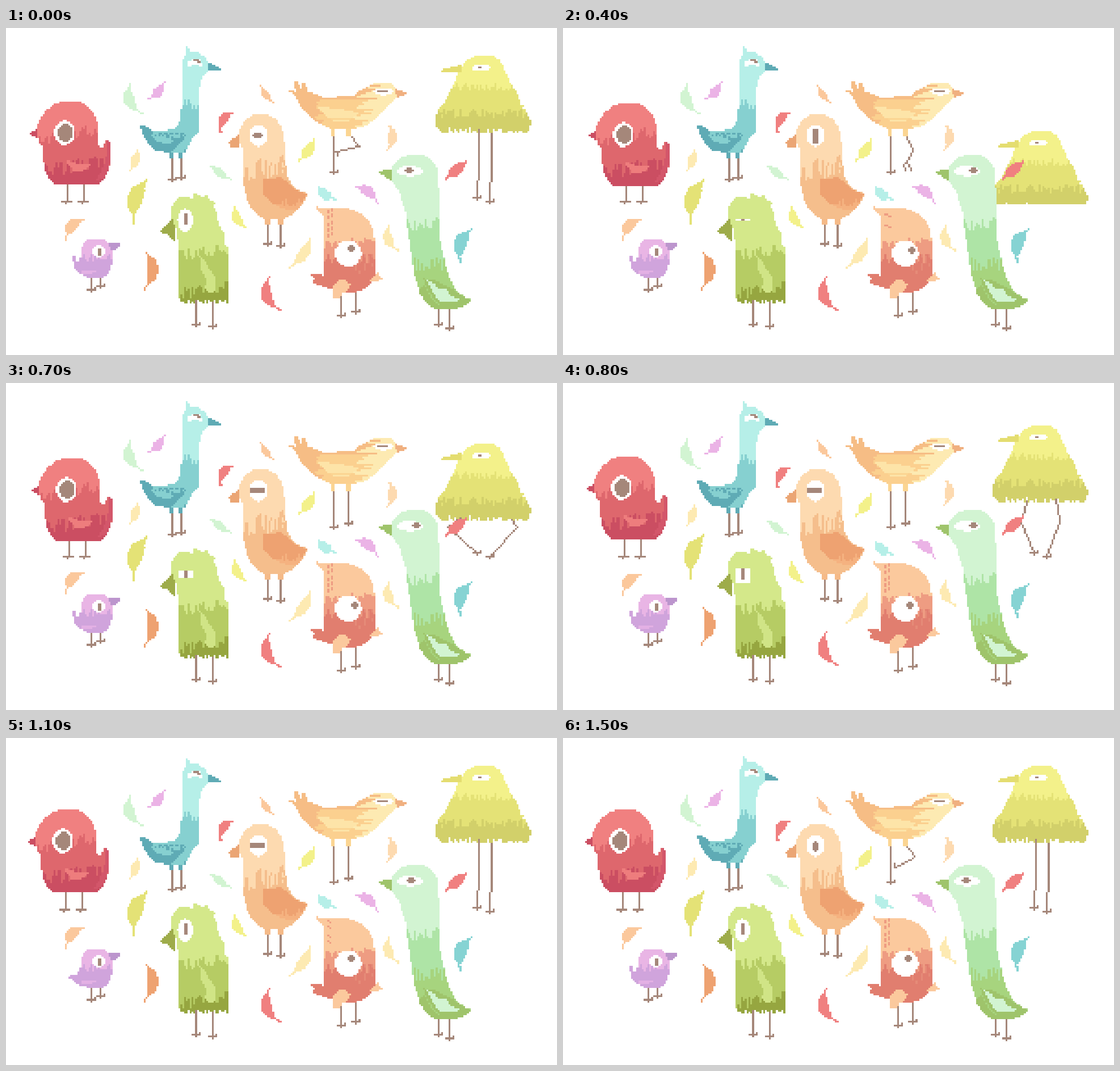
These frames come from a looping animation (971x577 px, 1.6 s). An HTML page with a canvas:

```html
<!DOCTYPE html>
<html lang="en">
<head>
<meta charset="utf-8">
<title>Birds</title>
<style>
html, body { margin: 0; width: 100%; height: 100%; overflow: hidden; background: #fff; }
canvas { display: block; width: 100%; height: 100%; image-rendering: pixelated; }
</style>
</head>
<body>
<canvas id="stage" width="300" height="178"></canvas>
<script>
const ctx = document.getElementById('stage').getContext('2d');
const CW = 971 / 300, CH = 577 / 178;
const STEP = 100, STEPS = 16;
const BROWN = '#a5877a', WHITE = '#fff';
const col = x => Math.floor(x / CW), row = y => Math.floor(y / CH);
const mix = (a, b, k) => a + (b - a) * k;

function hash(a, b = 0) {
  const v = Math.sin(a * 127.1 + b * 311.7) * 43758.5453;
  return v - Math.floor(v);
}

function dot(cx, cy, color, w = 1, h = 1) {
  ctx.fillStyle = color;
  ctx.fillRect(cx, cy, w, h);
}

// Coordinates are stage pixels; dx and dy are whole cells.
function box(x, y, w, h, color, dx = 0, dy = 0) {
  dot(Math.round(x / CW) + dx, Math.round(y / CH) + dy, color,
    Math.max(1, Math.round(w / CW)), Math.max(1, Math.round(h / CH)));
}

const cellCache = new Map();
function cellsOf(d) {
  if (cellCache.has(d)) return cellCache.get(d);
  const n = d.match(/[\d.]+/g).map(Number), path = new Path2D(d), cells = [];
  const xs = n.filter((_, i) => i % 2 === 0), ys = n.filter((_, i) => i % 2);
  for (let cy = row(Math.min(...ys)); cy <= row(Math.max(...ys)); cy++)
    for (let cx = col(Math.min(...xs)); cx <= col(Math.max(...xs)); cx++)
      if (ctx.isPointInPath(path, (cx + .5) * CW, (cy + .5) * CH)) cells.push([cx, cy]);
  cellCache.set(d, cells);
  return cells;
}

function paint(d, color, dx = 0, dy = 0) {
  for (const [cx, cy] of cellsOf(d)) {
    const c = typeof color === 'string' ? color : color((cx + .5) * CW, (cy + .5) * CH, cx, cy);
    if (c) dot(cx + dx, cy + dy, c);
  }
}

function oval(x, y, rx, ry, color, dx = 0, dy = 0) {
  for (let cy = row(y - ry); cy <= row(y + ry); cy++)
    for (let cx = col(x - rx); cx <= col(x + rx); cx++) {
      const u = ((cx + .5) * CW - x) / rx, v = ((cy + .5) * CH - y) / ry;
      if (u * u + v * v <= 1) dot(cx + dx, cy + dy, color);
    }
}

// Small pupil: a box with its four corner cells cut away.
function pupil(x, y, w, h, dx = 0, dy = 0) {
  box(x, y + CH, w, h - 2 * CH, BROWN, dx, dy);
  box(x + CW, y, w - 2 * CW, h, BROWN, dx, dy);
}

function line(color, ...p) {
  for (let i = 0; i + 3 < p.length; i += 2) {
    const x0 = col(p[i]), y0 = row(p[i + 1]), x1 = col(p[i + 2]), y1 = row(p[i + 3]);
    const n = Math.max(Math.abs(x1 - x0), Math.abs(y1 - y0), 1);
    for (let k = 0; k <= n; k++)
      dot(Math.round(mix(x0, x1, k / n)), Math.round(mix(y0, y1, k / n)), color);
  }
}

function foot(x, y, toe = 1) {
  dot(col(x) - 2, row(y), BROWN, 5);
  dot(col(x) + (toe > 0 ? 2 : -3), row(y) - 1 + (toe > 0 ? 0 : 1), BROWN);
  dot(col(x) + (toe > 0 ? 0 : -1), row(y) + 1, BROWN);
}

function leg(x, top, y, toe) {
  line(BROWN, x, top, x, y);
  foot(x, y, toe);
}

// Shaggy horizontal bands of colour, slanted by slope around x0.
function fur(colors, levels, amp = 10, slope = 0, x0 = 0, hem = Infinity) {
  return (x, y, cx) => {
    if (y > hem + (hash(cx, 7) - .5) * 9) return null;
    let i = 0;
    while (i < levels.length &&
      y > levels[i] + slope * (x - x0) + (hash(cx, i + levels[0]) - .5) * 2 * amp) i++;
    return colors[i];
  };
}

function yellowBird(s) {
  const drop = [0, 26, 58, 97, 133, 133, 97, 58, 26][s] || 0;
  const dy = Math.round(drop / CH), k = Math.min(drop / 58, 1.15);
  if (drop < 120) {
    const hip = 176 + drop;
    const knee = Math.max(mix(235, 254, k), hip + 8);
    line(BROWN, mix(832, 805, k), hip, mix(832, 780, k), knee, 831, 299);
    line(BROWN, mix(855, 886, k), hip, mix(855, 902, k), knee, 854, 305);
    foot(831, 299);
    foot(854, 305);
  }
  const coat = fur(['#f3f18a', '#e4e276', '#d2d06a'], [104, 151], 8, 0, 0, 181);
  paint('M830 49L858 49Q872 55 878 72L888 95L902 117L910 142L918 150L925 164L921 186L762 186L756 165L762 142L776 127L788 100L800 74L808 62Q815 52 830 49Z',
    (x, y, cx, cy) => (cy + dy + 1) * CH > 314 ? null : coat(x, y, cx), 0, dy);
  for (let i = 0; i < 18; i++) {
    const left = i % 2, y = 112 + i * 4;
    if (hash(i, 4) > .45 && y < 172)
      box(left ? 784 - (y - 112) * .5 : 900 + (y - 115) * .4, y, 4, 4, y < 148 ? '#e4e276' : '#d2d06a', 0, dy);
  }
  paint('M804 64L804 76L790 78L767 78L767 74L782 70Z', '#e4dd70', 0, dy);
  oval(838, 70, 17, 5.5, WHITE, 0, dy);
  box(831, 69, 7, 3, BROWN, 0, dy);
}

function redBird(s) {
  const d = [0, 0, 1, 1, 1, 1, 1, 1, 0, -1, -1, -1, -1, 0, -1, -1][s], x = d * CW;
  for (const lx of [109, 139]) leg(lx + x, 276 + x, d < 0 ? 302 : 306, -1);
  paint('M98 130L131 130Q146 137 155 152Q163 165 162 190L164 212Q173 212 175 199L181 199L183 207L186 206L186 228Q184 245 175 262Q167 273 159 277L89 277Q78 272 70 255Q65 245 66 212Q54 198 54 180Q56 160 72 145Q85 132 98 130Z',
    fur(['#f08080', '#de676d', '#cb4e62'], [188, 247], 12, -.16, 100), d, d);
  paint('M177 199L181 199L186 208L186 228Q183 248 170 266L158 270Q174 245 177 222Z', '#d3566a', d, d);
  paint('M56 176L42 187L56 197Z', '#cb4e62', d, d);
  paint('M104 233L118 236L130 241L149 241Q142 254 120 253Q112 246 104 233Z', '#ee7d7d', d, d);
  oval(103, 185, 18, 21.5, WHITE, d, d);
  oval(104.5, 185, 13.5, 15.5, BROWN, d, d);
}

function cyanBird(s) {
  const dy = s > 9 && s < 13 ? 1 : 0;
  leg(292, 228, 269);
  leg(308, 228, 263);
  box(288, 220, 8, 11, '#5fabb5', 0, dy);
  box(304, 220, 6, 11, '#5fabb5', 0, dy);
  paint('M317 34L321 33L324 41L338 43Q352 50 356 62L356 77Q348 82 344 92L340 112L340 184Q334 192 328 194L322 206L316 221L290 221L264 216Q244 202 235 171L248 174L262 183Q280 181 295 178Q307 172 309 150L310 72Q308 60 317 46Z',
    fur(['#b6efe8', '#86d0d0'], [134], 9), 0, dy);
  paint('M235 171L248 174L262 184L285 187L300 196L318 183Q312 204 302 207L316 214L316 221L290 221L264 216Q244 202 235 171Z',
    (x, y, cx) => y < 186 + hash(cx, 9) * 8 && x > 258 ? '#86d0d0' : '#5fabb5', 0, dy);
  paint('M254 188L276 192L298 198L288 205L268 201Z', '#86d0d0', 0, dy);
  paint('M300 209L318 200L314 219L290 220Z', '#86d0d0', 0, dy);
  for (let x = 268; x < 310; x += 10) box(x, 182 + hash(x) * 3, 6, 3, '#5fabb5', 0, dy);
  paint('M356 62L362 62L379 73L360 75L355 76Z', '#5fabb5', 0, dy);
  paint('M319 69L322 60L330 54L340 54L346 62L346 69L340 69L338 65L327 65L325 69Z', WHITE, 0, dy);
  box(329, 56, 10, 3, BROWN, 0, dy);
  box(335, 59, 7, 3, BROWN, 0, dy);
}

function beigeBird(s) {
  leg(578, 190, 253);
  if (s < 3) line(BROWN, 604, 188, 624, 208, 582, 220, 584, 226);
  else if (s === 3) line(BROWN, 604, 190, 622, 212, 599, 231, 598, 240);
  else if (s === 4) {
    line(BROWN, 604, 190, 617, 216, 607, 236, 614, 252);
    line(BROWN, 607, 236, 602, 240, 605, 250);
  } else if (s === 5) {
    line(BROWN, 604, 190, 609, 218, 603, 244);
    foot(603, 246);
  } else if (s < 14) leg(603, 190, 247);
  else if (s === 14) line(BROWN, 604, 188, 619, 212, 595, 229, 594, 238);
  else line(BROWN, 604, 188, 621, 208, 612, 216, 583, 227, 583, 222);
  box(574, 178, 8, 14, '#fbd592');
  box(598, 178, 9, 14, '#fbd592');
  paint('M499 111L506 109L511 117L508 95L514 95L519 110L521 95L526 97L532 112L546 117L558 122L612 121L622 112L638 104L650 97L676 97L687 106L690 120L684 126Q672 140 655 156Q640 172 618 177L605 179L575 178Q550 170 535 155L516 134L512 122Z',
    (x, y, cx, cy) => {
      const edge = (hash(cy, 3) - .5) * 38;
      if (x > 634 + edge - (y - 130) * .35) return '#fdeab2';
      return x < 552 + edge * .5 || y < 128 ? '#f6bd85' : '#fbd08f';
    });
  paint('M548 139L590 143L624 150L612 158L604 166L582 166Q564 158 548 139Z',
    (x, y, cx, cy) => hash(cy, 6) > .85 ? '#fbd592' : '#fde4a8');
  paint('M684 107L692 110L704 113L704 117L690 123Z', '#f0b080');
  oval(665, 112, 18, 6.5, WHITE);
  box(655, 110, 20, 3, BROWN);
}

function orangeBird(s) {
  leg(461, 344, 380);
  leg(484, 344, 384);
  box(456, 333, 10, 14, '#f5ba88');
  box(480, 333, 9, 13, '#f5ba88');
  paint('M436 153L462 153Q480 160 487 180L490 195L493 240L496 262Q508 288 531 291Q528 305 515 320Q505 332 490 336L455 336Q435 328 424 300L417 270L416 212Q410 200 410 190Q413 165 436 153Z',
    fur(['#fddab0', '#f5be8c'], [258], 24, -.6, 440));
  paint('M452 265L472 266L482 262L496 272Q508 288 531 291Q525 308 514 320L494 320Q462 310 453 292Z',
    (x, y, cx) => y > 302 + hash(cx, 5) * 14 ? '#f5b280' : '#eea271');
  for (let i = 0; i < 14; i++)
    box(464 + hash(i, 1) * 26, 212 + hash(i, 2) * 48, 3, 7, i % 2 ? '#f5be8c' : '#fddab0');
  paint('M410 188L391 203L397 210L412 212Z', '#eba574');
  oval(445, 190, 15.5, 19.5, WHITE);
  if (s < 3) pupil(434, 185, 20, 11);
  else if (s === 3 || s > 12) pupil(440, 180, 10, 20);
  else if (s < 6 || s === 12) box(440, 177, 9, 26, BROWN);
  else box(431, 186, 26, 10, BROWN);
}

function purpleBird(s) {
  leg(152, 438, 461);
  leg(168, 438, 455);
  paint('M147 372L172 372Q186 380 187 395L186 422Q180 438 170 440L145 440Q128 435 122 422L132 405L133 390Q137 376 147 372Z',
    fur(['#e9b5e5', '#d0a4dc'], [405], 6));
  paint(s > 8 && s < 14
    ? 'M134 412L124 418L104 421L114 425L124 435L140 438Z'
    : 'M117 401L121 401L125 412L136 414L140 438L128 432L119 420Z', '#d0a4dc');
  paint('M133 427L156 427L160 431L144 435L134 433Z', '#e3b0e4');
  paint('M181 380L200 380L200 384L187 396Z', '#bc95cd');
  oval(163, 394, 11, 10.5, WHITE);
  box(162, 388, 7, 13, BROWN);
}

function greenBird(s) {
  leg(335, 480, 523);
  leg(363, 480, 528);
  paint('M303 300L320 298L328 303L331 290L338 295L343 293L345 299L356 294L358 304L370 308L364 313L371 325L375 345L384 362L384 378L391 386L391 488L309 488L304 470L304 382L300 355L290 345L290 325Q294 308 303 300Z',
    fur(['#d4e88a', '#b6cc64', '#96a640'], [396, 463], 11, -.16, 340, 483));
  paint('M341 401L350 410L358 425L369 440L369 464L358 468L350 458L354 448L345 430Z', '#d0e486');
  paint('M293 338L270 360L285 364L299 379L299 352Z', '#9eac4a');
  const half = [20, 20, 13, 8, 2, 2, 2, 7, 13][s] || 20;
  if (half === 20) oval(316, 339, 13.5, 20, WHITE);
  else box(305, 339 - half, 26, half * 2, WHITE);
  const open = Math.min(half, 10);
  box(313, 339 - open, 7, open * 2, BROWN);
}

function roundBird(s) {
  leg(592, 464, 508);
  leg(618, 464, 500);
  paint('M545 315L560 318L600 318Q632 325 645 350L650 375L651 438Q645 452 632 460L615 466L585 466L562 457L550 454L537 448L544 444L538 436L550 433L561 437L561 335Z',
    fur(['#fbc99d', '#ee9c82', '#e17e6f'], [379, 406], 9));
  for (let i = 0; i < 13; i++)
    box(616 + (i % 5) * 7, 398 + Math.floor(i / 5) * 12 + (i % 2) * 5, 3, 7, '#e58b78');
  const crest = '#ee9c82', pose = [0, 0, 1, 1, 2, 2, 1, 0, 0, 0, 0, 1, 2, 2, 1, 0][s];
  if (pose === 0)
    for (let i = 0; i < 10; i++) box(565 + (i % 2) * 8, 320 + Math.floor(i / 2) * 11 - (i % 2) * 3, 3, 7, crest);
  else
    for (const y of pose === 1 ? [320, 332, 346, 358] : [328, 348]) {
      box(565, y, pose * 4, 3, crest);
      box(565 + pose * 4, y + 3, pose * 4, 4, crest);
    }
  paint('M655 432L665 443L652 448L640 447Z', '#fbc99d');
  paint('M576 456L584 448L592 442L607 452L606 460L592 469L590 475L577 475Z', '#fbc99d');
  oval(603, 398, 23.5, 23, WHITE);
  const look = [0, 0, 1, 2, 2, 2, 2, 2, 1][s] || 0;
  pupil(603, 381, 13, 13, look, Math.min(look, 1));
}

function tallBird(s) {
  leg(761, 493, 525);
  leg(782, 493, 530);
  paint('M705 225L738 225Q757 235 761 255L763 300L764 370L775 420Q785 460 805 472L821 480Q812 492 790 496L759 496Q738 490 729 465L719 435L713 390L706 345L704 325L692 285Q678 272 677 255Q680 235 705 225Z',
    fur(['#d2f4d2', '#aee4a6', '#a7d47e'], [345, 418], 13));
  paint('M727 462L738 452L748 474L762 488L790 488L806 473L821 480Q812 492 790 496L759 496Q738 490 727 462Z', '#9fc46b');
  paint('M736 442L760 446L782 458L806 473L794 490L766 490Q744 470 736 442Z', '#9fc46b');
  paint('M742 444L756 452L762 460L776 462L786 474L800 478L794 484L768 484Q750 470 742 444Z', '#d2f4d2');
  paint('M678 248L655 253L668 262L680 270Z', '#9fc46b');
  oval(712, 252.5, 22.5, 9, WHITE);
  const look = [0, 1, 3, 4, 4, 4, 4, 4, 4, 3, 2, 1][s] || 0;
  pupil(701, 247, 16, 10, look);
}

// Curved blade, fullest past its middle, with frayed edges and a thin stem.
function leaf([color, x1, y1, x2, y2, bend, width], dy) {
  const len = Math.hypot(x2 - x1, y2 - y1);
  const mx = (x1 + x2) / 2 - bend * (y2 - y1) / len, my = (y1 + y2) / 2 + bend * (x2 - x1) / len;
  const n = Math.ceil(len / 2);
  for (let i = 0; i <= n; i++) {
    const t = i / n, u = 1 - t;
    const x = u * u * x1 + 2 * u * t * mx + t * t * x2;
    const y = u * u * y1 + 2 * u * t * my + t * t * y2;
    const r = t < .85 ? width * Math.sin(Math.PI * Math.pow(t / .85, 1.15)) * (.82 + .3 * hash(i, x1)) : 0;
    if (r > 2) oval(x, y, r, r, color, 0, dy);
    else dot(col(x), row(y) + dy, color);
  }
}

const sinking = [
  ['#d2f4d2', 219, 102, 240, 154, 24, 9],
  ['#fbc89c', 449, 104, 471, 135, 6, 6],
  ['#fddab0', 676, 176, 671, 219, -16, 8],
  ['#e4e276', 249, 271, 226, 347, 22, 13],
  ['#eea271', 247, 399, 243, 464, -28, 10],
  ['#f08080', 463, 444, 484, 501, 29, 10],
  ['#fdeab2', 674, 352, 692, 396, 20, 8],
  ['#f08080', 811, 239, 774, 270, 0, 9]
];
const rising = [
  ['#ebb3e6', 279, 93, 252, 123, -6, 8],
  ['#f08080', 400, 146, 379, 181, 18, 8],
  ['#fdeab2', 232, 212, 218, 249, -5, 8],
  ['#d2f4d2', 362, 240, 396, 263, 4, 7],
  ['#f3f18a', 543, 194, 516, 231, -6, 9],
  ['#f3f18a', 404, 314, 422, 348, 13, 8],
  ['#fbc89c', 139, 335, 106, 370, 19, 9],
  ['#fdeab2', 536, 368, 500, 419, -12, 9],
  ['#b6efe8', 551, 276, 581, 299, 9, 9],
  ['#ebb3e6', 617, 277, 654, 305, -13, 9],
  ['#86d3d3', 819, 353, 802, 411, 22, 11]
];

const birds = [yellowBird, redBird, cyanBird, beigeBird, orangeBird, purpleBird, greenBird, roundBird, tallBird];

function draw(s) {
  dot(0, 0, WHITE, 300, 178);
  birds.forEach(bird => bird(s));
  const sway = [-1, 0, 1, 0][s % 4];
  // Every second beat, at steps 0 and 4, the first group sits high.
  sinking.forEach(l => leaf(l, s === 2 ? 1 : sway));
  rising.forEach(l => leaf(l, s === 2 ? -1 : -sway));
}

const start = performance.now();
let shown = -1;
function tick() {
  const s = Math.floor((performance.now() - start) / STEP) % STEPS;
  if (s !== shown) draw(shown = s);
  requestAnimationFrame(tick);
}
tick();
</script>
</body>
</html>
```
